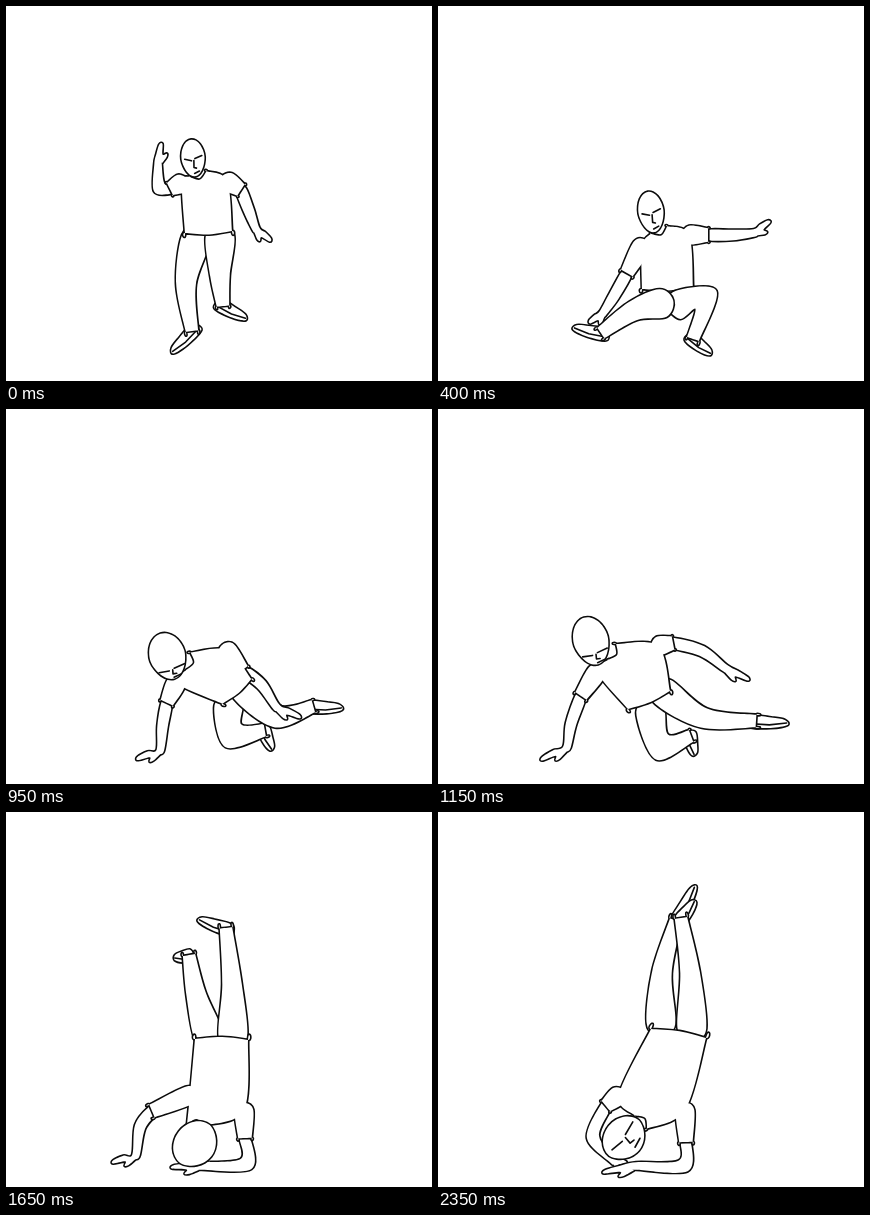
An HTML page with a canvas that plays this animation: 426 px wide and 375 px high, repeating every 2.4 s.

```html
<!DOCTYPE html>
<html lang="en">
<head>
<meta charset="utf-8">
<title>Breakdance</title>
<style>
  html, body { margin: 0; width: 100%; height: 100%; overflow: hidden; background: #fff; }
  canvas { display: block; width: 100%; height: 100%; }
</style>
</head>
<body>
<canvas id="stage"></canvas>
<script>
const W = 426, H = 375, LOOP = 2400, STEP = 50, LINE = 1.6;

// Joints of the key poses, as x,y pairs.
// head: x, y, half width, half height, tilt, look (how far the face points down)
// body: neck, shoulders, hips; arm: cuff, elbow, wrist, fingertip; leg: hip, knee, ankle, toe
const poses = [
  { at: 0, head: [187,152, 12,19, -6, 0],
    body: [192,168, 176,177, 221,175, 179,227, 226,225],
    armL: [164,183, 153,181, 152,158, 156,138], armR: [235,184, 243,205, 250,223, 264,235],
    legL: [190,232, 180,278, 186,325, 167,345], legR: [214,230, 214,270, 217,300, 239,312] },
  { at: 400, legsInFront: true, head: [213,206, 13,21, -9, 0],
    body: [221,224, 204,240, 251,229, 204,283, 255,281],
    armL: [189,267, 176,290, 165,307, 152,317], armR: [270,229, 295,229, 316,227, 332,216],
    legL: [225,297, 195,305, 163,327, 137,322], legR: [240,299, 268,294, 255,333, 272,347] },
  { at: 700, head: [172,266, 19,23, -18, 0.6],
    body: [193,264, 184,288, 222,246, 249,288, 262,255],
    armL: [183,302, 186,320, 186,345, 166,350], armR: [238,295, 245,318, 249,346, 273,356],
    legL: [235,290, 232,313, 266,314, 277,333], legR: [254,276, 278,306, 294,279, 318,280] },
  { at: 1150, head: [153,232, 18,25, -17, 0.5],
    body: [174,243, 159,263, 220,237, 190,300, 232,282],
    armL: [143,287, 133,315, 129,338, 104,351], armR: [235,234, 264,242, 287,259, 310,271],
    legL: [212,302, 224,338, 253,327, 256,345], legR: [225,283, 266,309, 318,312, 348,314] },
  { at: 1650, head: [189,332, 25,21, -52, 1],
    body: [190,313, 184,283, 238,298, 189,227, 242,228],
    armL: [146,299, 134,315, 130,343, 107,351], armR: [239,326, 240,352, 195,354, 166,356],
    legL: [203,225, 190,182, 183,143, 169,146], legR: [227,225, 226,172, 220,116, 194,108] },
  { at: 1850, head: [186,326, 18,19, -49, -0.4],
    body: [197,313, 173,280, 238,298, 187,218, 238,214],
    armL: [169,292, 163,318, 180,345, 192,348], armR: [238,322, 238,354, 193,356, 164,360],
    legL: [202,212, 203,172, 237,136, 235,112], legR: [226,210, 226,152, 249,148, 253,114] },
  { at: 2000, head: [186,326, 24,20, -50, -0.1],
    body: [203,310, 181,283, 247,298, 213,217, 268,226],
    armL: [168,294, 155,325, 175,348, 188,352], armR: [248,330, 245,354, 198,354, 166,361],
    legL: [223,212, 224,160, 238,108, 256,76], legR: [254,217, 252,160, 243,106, 256,90] }
];
const parts = ["head", "body", "armL", "armR", "legL", "legR"];

const ctx = stage.getContext("2d");
const mix = (a, b, u) => a + (b - a) * u;
const add = (p, d, n, x, y) => [p[0] + d[0] * x + n[0] * y, p[1] + d[1] * x + n[1] * y];
const gap = (a, b) => Math.hypot(b[0] - a[0], b[1] - a[1]);
const unit = (a, b) => { const l = gap(a, b) || 1; return [(b[0] - a[0]) / l, (b[1] - a[1]) / l]; };
const turn = d => [-d[1], d[0]];
const pairs = list => list.flatMap((x, i) => i % 2 ? [] : [[x, list[i + 1]]]);
const sharp = p => [p, p];

// Closed smooth outline; a doubled point is a corner.
function outline(pts) {
  const path = new Path2D(), n = pts.length, at = i => pts[(i + n) % n];
  path.moveTo(...pts[0]);
  for (let i = 0; i < n; i++) {
    const [a, b, c, d] = [at(i - 1), at(i), at(i + 1), at(i + 2)];
    path.bezierCurveTo(b[0] + (c[0] - a[0]) / 6, b[1] + (c[1] - a[1]) / 6,
      c[0] - (d[0] - b[0]) / 6, c[1] - (d[1] - b[1]) / 6, c[0], c[1]);
  }
  return path;
}

// Outline several shapes as one.
function ink(...shapes) {
  ctx.lineWidth = LINE * 2;
  shapes.forEach(s => ctx.stroke(s));
  shapes.forEach(s => ctx.fill(s));
}

function line(...pts) {
  ctx.lineWidth = LINE;
  ctx.beginPath();
  pts.forEach(p => ctx.lineTo(...p));
  ctx.stroke();
}

// Tapered tube around a chain of joints, with an optional shape at its end.
function tube(chain, widths, end = []) {
  const last = chain.length - 1;
  const side = s => chain.map((p, i) => {
    const a = unit(chain[Math.max(0, i - 1)], chain[Math.max(1, i)]);
    const b = unit(chain[Math.min(i, last - 1)], chain[Math.min(i + 1, last)]);
    const n = turn(unit([0, 0], [a[0] + b[0], a[1] + b[1]]));
    const cos = n[0] * -a[1] + n[1] * a[0];
    return add(p, n, n, s * (widths[i] - LINE / 2) / Math.max(0.7, cos), 0);
  });
  const d = unit(chain[0], chain[1]), left = side(-1), right = side(1);
  const tip = end.length ? [left[last], ...end, right[last]] : [...sharp(left[last]), ...sharp(right[last])];
  return outline([add(chain[0], d, d, -widths[0] * 0.7, 0), ...left.slice(0, last), ...tip, ...right.slice(0, last).reverse()]);
}

// Frame from a joint to the tip of a hand or shoe, its underside facing the floor.
function frame(from, to) {
  const d = unit(from, to), s = d[0] < 0 ? -1 : 1;
  const n = turn(d).map(v => v * s), l = gap(from, to);
  return { s, place: (x, y) => add(from, d, n, x * l, y) };
}

function arm(j) {
  const { s, place } = frame(j[2], j[3]);
  const hand = [place(0.5, -3.5), place(0.95, -2.5), place(1, 0.5), place(0.5, 2.5),
    place(0.58, 6.5), place(0.42, 7), place(0.1, 4)];
  ink(tube(j.slice(0, 3), [6, 6, 4.5], s < 0 ? hand.reverse() : hand));
}

function leg(j) {
  const { place } = frame(j[2], j[3]);
  ink(outline([place(-0.15, -5), place(0.5, -4.5), place(0.95, -3), place(1.05, 2),
    place(0.5, 6), place(-0.2, 6.5), place(-0.3, 2)]));
  line(place(1.02, 0), place(0.45, 3), place(-0.25, 3));
  ink(tube(j.slice(0, 3), [15, 10.5, 7]));
}

function body([neck, shL, shR, hipL, hipR], cuffL, cuffR, head) {
  const d = unit(head, neck), n = turn(d);
  const ends = [add(neck, d, n, 0, 9), add(neck, d, n, 0, -9)];
  ends.sort((a, b) => gap(a, shL) - gap(b, shL));
  const mid = [mix(hipL[0], hipR[0], 0.5), mix(hipL[1], hipR[1], 0.5)];
  const down = unit(neck, mid);
  ink(
    outline([add(neck, d, n, 6, 0), ...sharp(ends[0]), shL, ...sharp(hipL),
      add(mid, down, down, 2.5, 0), ...sharp(hipR), shR, ...sharp(ends[1])]),
    tube([shL, cuffL], [10, 7.5]), tube([shR, cuffR], [10, 7.5]));
}

function head([x, y, rx, ry, tilt, look]) {
  const a = tilt * Math.PI / 180, right = [Math.cos(a), Math.sin(a)], down = turn(right);
  const place = (u, v) => add([x, y], right, down, u * rx, v * ry);
  const skull = Array.from({ length: 16 }, (_, i) => {
    const t = i / 8 * Math.PI, v = Math.cos(t);
    return place(Math.sin(t) * (1 - 0.12 * Math.max(0, v)) * 0.96, v * 0.97);
  });
  ink(outline(skull));
  if (look > 0.85) return;
  const face = (u, v) => place(u, look + v * (1 - Math.max(0, look)));
  line(face(-0.7, 0.02), face(-0.15, 0.14));
  line(face(0.15, 0.04), face(0.75, -0.08));
  line(face(0.05, 0.14), face(0, 0.5), face(0.2, 0.55));
  line(face(0, 0.82), face(0.42, 0.72));
}

function draw(time) {
  let i = 0;
  while (i < poses.length - 2 && poses[i + 1].at <= time) i++;
  const a = poses[i], b = poses[i + 1], u = Math.min(1, (time - a.at) / (b.at - a.at)), p = {};
  for (const k of parts) {
    const now = a[k].map((v, n) => mix(v, b[k][n], u));
    p[k] = k === "head" ? now : pairs(now);
  }
  const scale = devicePixelRatio || 1;
  stage.width = innerWidth * scale;
  stage.height = innerHeight * scale;
  ctx.setTransform(stage.width / W, 0, 0, stage.height / H, 0, 0);
  ctx.fillStyle = "#fff";
  ctx.fillRect(0, 0, W, H);
  ctx.strokeStyle = "#0c0c0c";
  ctx.lineCap = ctx.lineJoin = "round";

  const front = (u < 0.5 ? a : b).legsInFront;
  if (!front) { leg(p.legL); leg(p.legR); }
  arm(p.armL);
  arm(p.armR);
  body(p.body, p.armL[0], p.armR[0], p.head);
  if (front) { leg(p.legR); leg(p.legL); }
  head(p.head);
}

const start = performance.now();
let shown = -1;
function tick() {
  const t = Math.floor((performance.now() - start) % LOOP / STEP) * STEP;
  if (t !== shown) draw(shown = t);
  requestAnimationFrame(tick);
}
tick();
</script>
</body>
</html>
```
